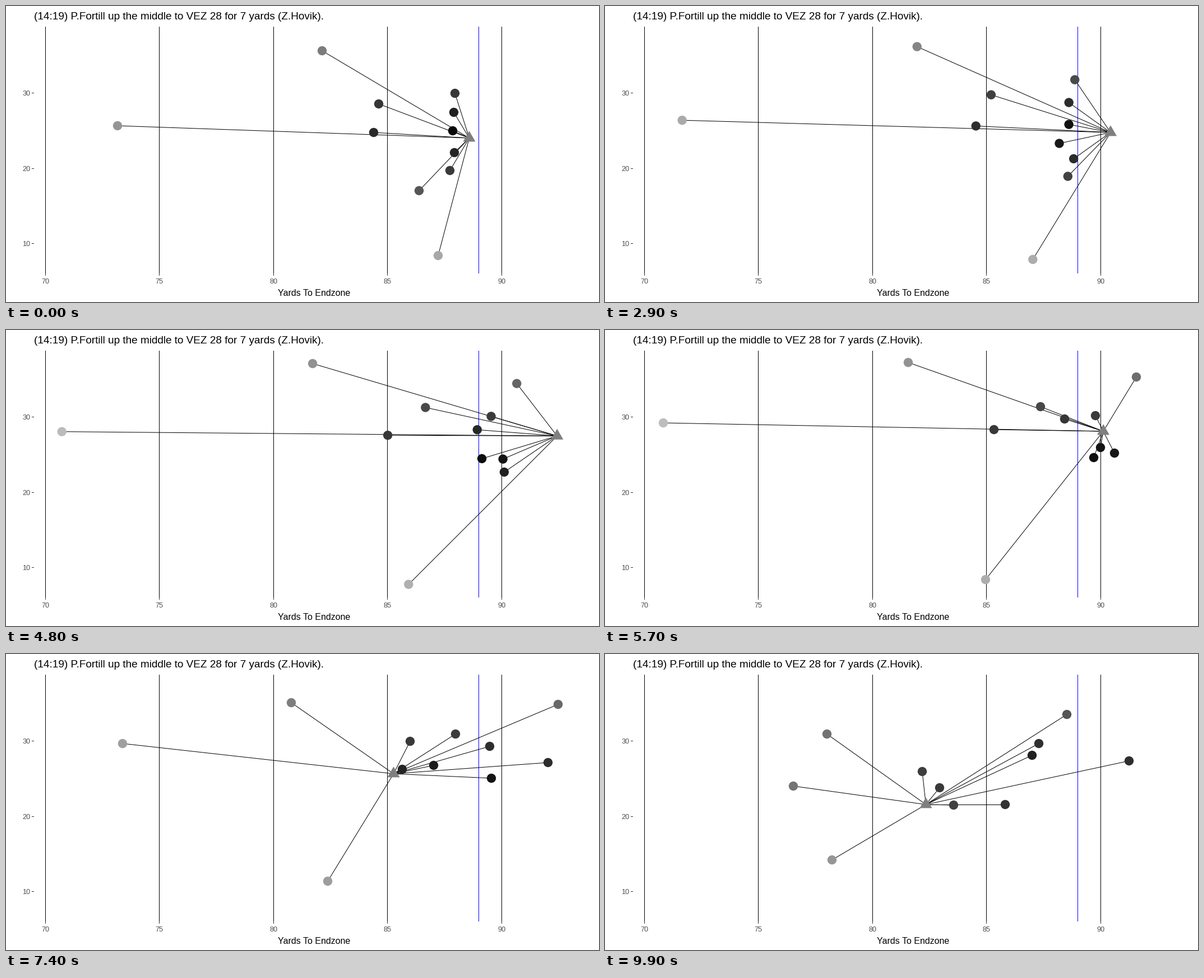
Write a matplotlib script that moves like this. It is 1058 by 529 pixels and loops after 10 s.

```python
import numpy as np
import matplotlib.pyplot as plt
from matplotlib.animation import FuncAnimation
from matplotlib.collections import LineCollection

WIDTH, HEIGHT, DPI = 1058, 529, 100
FRAMES, INTERVAL = 100, 100
PX = 72 / DPI  # points per pixel
RADIUS = 8.2
YARD = np.array([40.68, 13.43])  # pixels per yard along x and y
SNAP = 1.7  # seconds until the play starts
WAYPOINT_TIMES = (4.0, 5.7, 7.4, 9.9)

plt.rcParams["font.family"] = "Liberation Sans"


class Runner:
    """Smooth run through a few waypoints, after a slow drift up to the snap."""

    def __init__(self, start, *waypoints, drift=0.1, times=WAYPOINT_TIMES):
        start, first = np.array(start), np.array(waypoints[0])
        self.times = np.array([0, SNAP, *times])
        self.points = np.array([start, start + drift * (first - start), *waypoints])
        self.speeds = np.gradient(self.points, self.times, axis=0)

    def at(self, t):
        i = np.clip(np.searchsorted(self.times, t, side="right") - 1,
                    0, len(self.times) - 2)
        span = self.times[i + 1] - self.times[i]
        u = (t - self.times[i]) / span
        ease = u * u * (3 - 2 * u)
        leave, arrive = u * (1 - u) ** 2, u * u * (u - 1)
        return ((1 - ease) * self.points[i] + ease * self.points[i + 1]
                + span * (leave * self.speeds[i] + arrive * self.speeds[i + 1]))


ball = Runner((826.5, 236), (902, 226), (996, 203), (1002, 196), (889, 181),
              (691.5, 214), (572.5, 269), drift=0.03,
              times=(2.9, 4.0, 4.4, 5.7, 7.4, 9.9))

# Defenders are shaded by their distance from this point.
pack = Runner((797, 223), (838, 224), (850, 222), (825, 215), (790, 215))

defenders = [
    Runner((199, 214), (112, 196), (104, 166), (208, 160), (336, 236), drift=0.33),
    Runner((564, 80), (550, 66), (541, 58), (509, 87), (396, 143)),
    Runner((665, 175), (721, 143), (777, 137), (802, 143), (774, 160), drift=0),
    Runner((656, 226), (670, 202), (694, 178), (707, 206), (622, 270)),
    Runner((801, 156), (877, 110), (948, 84), (985, 90), (824, 108)),
    Runner((799, 190), (852, 159), (875, 153), (863, 165), (762, 181)),
    Runner((797, 223), (845, 197), (820, 159), (721, 156), (566, 210)),
    Runner((800, 262), (826, 233), (872, 228), (866, 222), (714, 269)),
    Runner((792, 294), (870, 251), (884, 210), (763, 199), (597, 239)),
    Runner((737, 330), (870, 284), (909, 220), (967, 194), (935, 191), drift=0.3),
    Runner((771, 446), (744, 457), (679, 446), (574, 406), (405, 368), drift=0),
]


def shade(spot, center):
    gray = 8 + 9.6 * np.hypot(*((spot - center) / YARD))
    return str(min(gray, 190) / 255)


fig = plt.figure(figsize=(WIDTH / DPI, HEIGHT / DPI), dpi=DPI, facecolor="white")
ax = fig.add_axes([0, 0, 1, 1])
ax.set(xlim=(0, WIDTH), ylim=(HEIGHT, 0))
ax.axis("off")


def label(x, y, text, size, color="black", ha="center"):
    ax.text(x, y, text, fontsize=size * PX, color=color, ha=ha, va="baseline")


def rule(xs, ys, color):
    ax.plot(xs, ys, color=color, lw=PX, solid_capstyle="butt", snap=False, zorder=1)


def vertical(x, top, bottom, color):
    x = np.floor(x) + 0.5  # centre of a pixel column, for a crisp line
    rule((x, x), (top, bottom), color)


def yard_x(yards):
    return 70.4 + (yards - 70) * YARD[0]


label(50, 23.5, "(14:19) P.Fortill up the middle to VEZ 28 for 7 yards (Z.Hovik).",
      19, ha="left")
label(550, 518, "Yards To Endzone", 16)

for yards in range(70, 91, 5):
    vertical(yard_x(yards), 478, 482, "#333333")
    vertical(yard_x(yards), 37, 478, "black")
    label(yard_x(yards), 496.5, str(yards), 12.65, "#4d4d4d")
vertical(yard_x(89), 37, 478, "blue")

for value in (10, 20, 30):
    y = np.floor(424.5 - (value - 10) * YARD[1]) + 0.5
    rule((46, 50), (y, y), "#333333")
    label(43, y + 4.5, str(value), 12.65, "#4d4d4d", ha="right")

links = ax.add_collection(LineCollection([], colors="black", linewidths=PX, zorder=2))
dots = ax.scatter(np.zeros(len(defenders)), np.zeros(len(defenders)),
                  s=(2 * RADIUS * PX) ** 2, linewidths=0, zorder=3)
marker = ax.add_patch(plt.Polygon(np.zeros((3, 2)), facecolor="#7f7f7f",
                                  edgecolor="none", zorder=4))
TRIANGLE = RADIUS * np.array([(0, -1.555), (1.347, 0.778), (-1.347, 0.778)])


def draw(frame):
    t = frame * INTERVAL / 1000
    carrier, center = ball.at(t), pack.at(t)
    spots = [runner.at(t) for runner in defenders]
    links.set_segments([(spot, carrier) for spot in spots])
    dots.set_offsets(spots)
    dots.set_facecolors([shade(spot, center) for spot in spots])
    marker.set_xy(carrier + TRIANGLE)
    return links, dots, marker


animation = FuncAnimation(fig, draw, frames=FRAMES, interval=INTERVAL,
                          repeat=True, repeat_delay=0)
plt.show()
```
